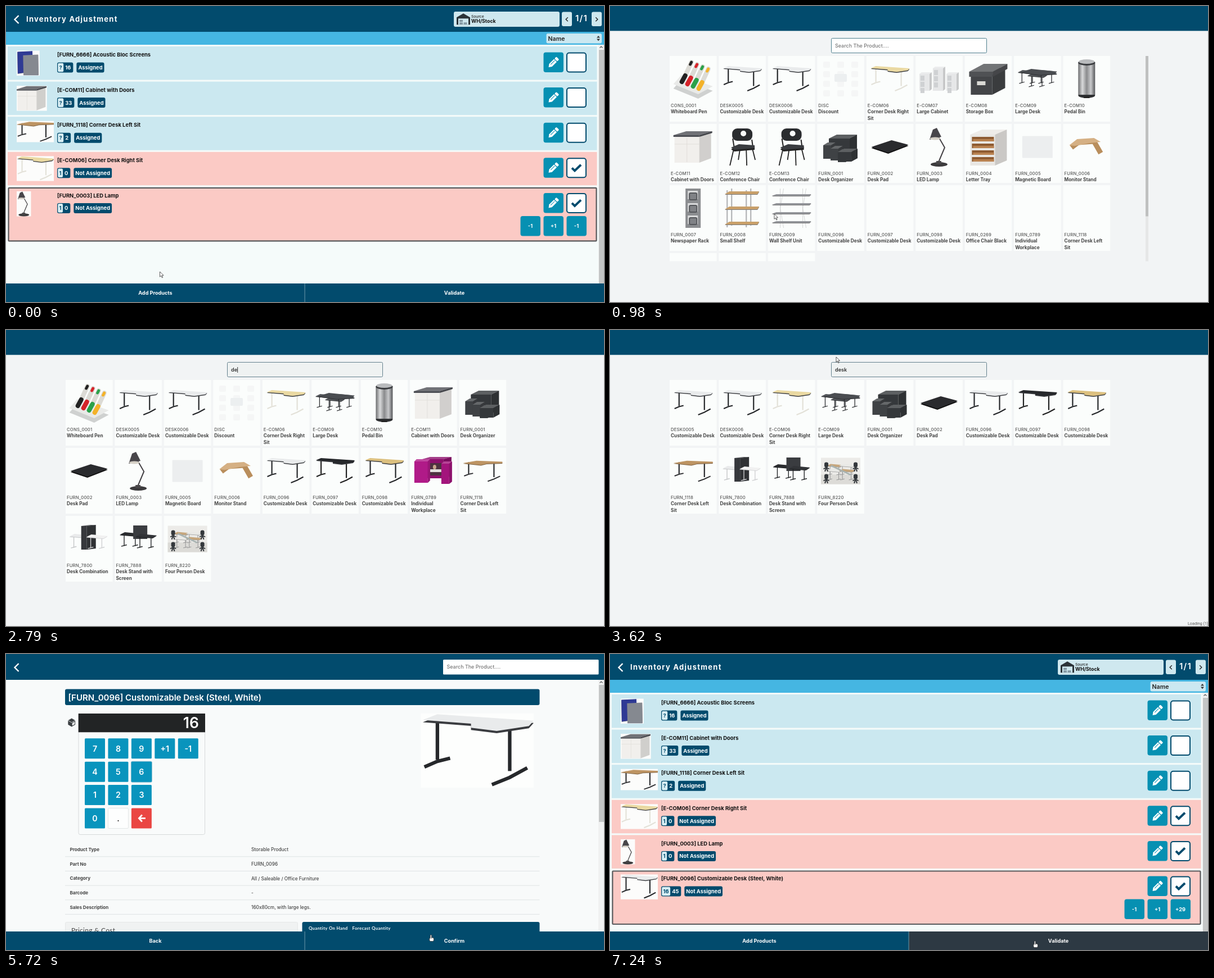
Animation, 1063 px wide and 527 px high, one loop 7260 ms. Source, as an HTML page with a canvas:

```html
<!DOCTYPE html>
<html lang="en">
<head>
<meta charset="utf-8">
<title>Inventory Adjustment</title>
<style>
html, body { margin: 0; width: 100%; height: 100%; overflow: hidden; background: #f2f4f5; }
canvas { display: block; }
</style>
</head>
<body>
<canvas id="stage" width="1063" height="527"></canvas>
<script>
const g = document.getElementById('stage').getContext('2d');
const LOOP = 7260;
const NAVY = '#024b6d', TEAL = '#0690b2', KEY = '#0994bd', HOVER = '#2d3943', INK = '#2a2c2f';
const SANS = 'Inter, "Open Sans", sans-serif', LATO = 'Lato, "Open Sans", sans-serif';
const times = (n, f) => { for (let i = 0; i < n; i++) f(i); };

// ---- drawing helpers ----
function rect(c, x, y, w, h) { g.fillStyle = c; g.fillRect(x, y, w, h); }
function box(x, y, w, h, fill, r = 3, stroke, lw = 1) {
  g.beginPath(); g.roundRect(x, y, w, h, r);
  if (fill) { g.fillStyle = fill; g.fill(); }
  if (stroke) { g.strokeStyle = stroke; g.lineWidth = lw; g.stroke(); }
}
function path(p) {
  g.beginPath();
  for (let i = 0; i < p.length; i += 2) g.lineTo(p[i], p[i + 1]);
}
function poly(c, ...p) { path(p); g.fillStyle = c; g.fill(); }
function line(c, w, ...p) { path(p); g.strokeStyle = c; g.lineWidth = w; g.stroke(); }
function oval(c, x, y, rx, ry = rx) {
  g.beginPath(); g.ellipse(x, y, rx, ry, 0, 0, 7); g.fillStyle = c; g.fill();
}
function at(x, y, s, f) { g.save(); g.translate(x, y); g.scale(s, s); f(); g.restore(); }
// a flat top with a darker edge below it
function slab(c, edge, thick, ...p) {
  at(0, thick, 1, () => poly(edge, ...p));
  poly(c, ...p);
}
// an oblique box: front face, lighter top, darker side
function block(c, x, y, w, h, dx, dy) {
  const r = x + w;
  rect(c, x, y, w, h);
  for (const [shade, ...p] of [
    ['#fff3', x, y, x + dx, y - dy, r + dx, y - dy, r, y],
    ['#0002', r, y, r + dx, y - dy, r + dx, y - dy + h, r, y + h],
  ]) { poly(c, ...p); poly(shade, ...p); }
}
// y is the middle of the capitals
function text(s, x, y, size, color, { w = 700, align = 'left', font = SANS, gap = 0 } = {}) {
  g.font = `${w} ${size}px ${font}`;
  g.letterSpacing = gap + 'px';
  g.textAlign = align; g.fillStyle = color;
  g.fillText(s, x, y + size * 0.36);
}
function width(s, size) {
  g.font = `700 ${size}px ${SANS}`; g.letterSpacing = '0px';
  return g.measureText(s).width;
}

// ---- product pictures: [width, height, draw] ----
function legs(c) {
  times(2, k => {
    const x = 9 + 45 * k, y = 5 + 3 * k, end = y + 24 + 4 * k;
    rect(c, x, y, 2.2, end - y);
    line(c, 2.2, x - 7 - 3 * k, end + 4.5 + 4 * k, x + 1, end + 1 + 3 * k, x + 9 + 3 * k, end - 1 - k);
  });
}
function bench(top, leg, x, y, s = .9) {
  at(x, y, s, () => {
    for (const k of [8, 30]) { rect(leg, k, 5, 1.5, 22); line(leg, 1.5, k - 5, 28, k + 6, 25); }
    slab(top, leg, 1, 0, 5, 10, 0, 42, 3, 34, 8);
  });
}
function tiers(c, n, y0, step, w, h) {
  times(n, i => slab(c, '#777', 1, 0, y0 + i * step + h, 8, y0 + i * step, w, y0 + i * step, w - 3, y0 + i * step + h));
}
function spokes(c, x, y, n, r) {
  times(n, i => { const a = i / (n - 1) * Math.PI; line(c, 2, x, y, x + r * Math.cos(a), y + 3 + 5 * Math.sin(a)); });
}

const art = {
  desk: [70, 47, (top, leg) => {
    legs(leg);
    slab(top, '#3a3c40', 1.4, 1, 4.2, 10, .6, 70, 4.6, 67, 8, 47, 11, 31, 9, 31, 6.5);
  }],
  corner: [70, 40, (top, leg) => {
    g.scale(1, .86); legs(leg);
    slab(top, '#7d6244', 1.2, 0, 7, 24, 2, 70, 4, 70, 7, 42, 8, 32, 11);
  }],
  pens: [70, 70, () => {
    slab('#e9eae8', '#cfd1d0', 8, 0, 44, 14, 28, 70, 48, 44, 62);
    g.lineCap = 'round';
    ['#222', '#d6242a', '#2ba14a', '#f3b229'].forEach((c, i) => {
      const x = 32 + 10 * i, y = 5 + 4 * i;
      line('#dcdbd5', 8, x, y, x - 10, y + 22);
      line(c, 8, x - 11, y + 24, x - 17, y + 35);
      line(c, 5, x, y, x - 2, y + 4);
    });
    g.lineCap = 'butt';
  }],
  tiles: [70, 70, () => {
    times(12, i => box(4 + i % 3 * 25, 4 + (i / 3 | 0) * 17, 12, 11, '#f5f6f6', 2));
    box(24, 26, 22, 14, '#eceff0', 2);
  }],
  cabinets: [70, 46, () => times(3, k => {
    const y = 10 * Math.abs(k - 1) + 4;
    block('#e6e7e8', 24 * k, y, 18, 44 - y, 4, 3);
    times(3, i => rect('#cfd1d3', 24 * k + 2, y + 3 + i * 11, 7, 9));
  })],
  box: [70, 56, () => {
    block('#434548', 4, 20, 38, 36, 23, 12);
    block('#4f5154', 1, 15, 42, 9, 26, 14);
    rect('#d9d9d5', 15, 32, 15, 7);
  }],
  large: [70, 44, () => {
    times(3, k => bench('#55585c', INK, 17 * k, 6 + 6 * (k % 2), .85));
    slab('#4a4d51', INK, 1, 4, 10, 24, 4, 62, 8, 70, 13, 38, 15);
  }],
  bin: [32, 70, () => {
    const m = g.createLinearGradient(1, 0, 31, 0);
    ['#6d6e70', '#d9dadb', '#8a8b8d', '#c9cacc', '#55575a'].forEach((c, i) => m.addColorStop(i / 4, c));
    oval('#2e3032', 16, 64, 15, 5); rect(m, 1, 5, 30, 58);
    oval('#3a3c3f', 16, 6, 15, 5); oval('#b9bbbd', 16, 4, 14, 4); rect('#222', 11, 66, 10, 3);
  }],
  cabinet: [70, 58, () => {
    block('#f1efec', 2, 11, 44, 46, 21, 8);
    line('#dcd9d4', .7, 24, 13, 24, 56); line('#dcd9d4', .7, 2, 24, 46, 24);
    block('#4d4f55', 0, 8, 46, 3, 23, 7);
  }],
  chair: [52, 70, () => {
    times(4, i => line('#222', 1.8, 11 + 11 * i, 38, 4 + 15 * i, 58 + 10 * (1 - i % 2)));
    line('#222', 2, 9, 20, 12, 38); line('#222', 2, 43, 22, 45, 36);
    box(8, 2, 36, 22, INK, 9); oval('#f8f9f9', 28, 11, 5);
    slab('#3a3c40', '#222', 3, 6, 36, 20, 30, 48, 32, 48, 37, 12, 40);
  }],
  organizer: [66, 54, () => {
    block('#35383b', 12, 12, 36, 34, 14, 7);
    times(3, i => block('#3f4245', 2 + 13 * i, 24 + 6 * i, 14, 24 - 3 * i, 8, 5));
    block('#35383b', 28, 36, 24, 17, 11, 6);
  }],
  pad: [66, 24, () => slab('#2a2b2e', '#111', 2, 0, 12, 36, 0, 66, 8, 30, 22)],
  lamp: [40, 70, () => {
    oval('#3c3b3d', 20, 66, 15, 4); rect('#4a484a', 15, 60, 9, 5);
    line('#444245', 2, 19, 62, 30, 36, 15, 10);
    poly('#48464a', 9, 4, 16, 1, 24, 17, 3, 22); oval('#d5d0c6', 13, 20, 9, 2.5);
  }],
  tray: [70, 68, () => {
    block('#e9e7e3', 3, 12, 44, 55, 21, 9);
    times(4, i => { rect('#8e5b32', 6, 16 + 12 * i, 39, 8); rect('#b98250', 8, 20 + 12 * i, 37, 4); });
  }],
  board: [54, 39, () => box(0, 0, 54, 39, '#eceeef', 1)],
  stand: [62, 32, () => {
    g.lineJoin = 'round';
    line('#b98e5c', 9, 4, 17, 16, 8, 44, 6, 56, 27);
    poly('#d5b084', 0, 13, 14, 2, 44, 0, 56, 7, 36, 9, 10, 14);
  }],
  rack: [27, 70, () => {
    rect('#8b8d90', 0, 0, 27, 70);
    times(3, i => { const y = 4 + 22 * i; rect('#d9dadb', 4, y, 18, 15); box(7, y + 4, 13, 12, '#808286', 2, '#55575b', 2); });
  }],
  shelves: [62, 70, () => {
    times(4, i => rect('#b2b4b6', 3 + 17 * i + (i % 2 ? -9 : 0), i % 2 ? 0 : 3, 2.2, 66));
    tiers('#c9a06a', 3, 5, 27, 61, 5);
  }],
  wall: [70, 70, () => {
    for (const x of [15, 55]) { line('#c4c6c8', .7, x, 0, x, 70); line('#c4c6c8', .7, x + 6, 0, x, 35, x + 6, 70); }
    tiers('#94969b', 4, 10, 16, 70, 3);
  }],
  office: [48, 70, () => {
    box(9, 0, 28, 37, '#27282b', 8); box(13, 4, 20, 14, '#37393c', 5);
    for (const x of [5, 42]) line('#1d1e20', 3, x, 24, x, 37, 24, 42);
    box(8, 36, 31, 11, '#2e3033', 5); rect('#222', 22, 46, 4, 14);
    spokes('#222', 24, 58, 5, 19);
  }],
  booth: [68, 54, () => {
    block('#8d0f6c', 14, 6, 38, 34, 14, 4); rect('#4d3140', 24, 13, 28, 22);
    rect('#e3e0de', 28, 24, 20, 5); oval('#c8a58c', 36, 20, 3, 4);
    block('#b01a88', 0, 10, 24, 38, 4, 4); block('#a3147c', 48, 14, 14, 36, 5, 4);
  }],
  screens: [64, 70, () => ['#2f3a94', '#858990'].forEach((c, i) => {
    const x = 2 + 16 * i, y = 2 + 10 * i;
    slab(c, '#555a70', 1, x, y + 1, x + 42, y - 1, x + 43, y + 56, x + 1, y + 62 - 6 * i);
  })],
  combo: [70, 52, () => {
    bench('#e9eaeb', '#c3c5c7', 0, 17); block('#36383c', 21, 3, 10, 42, 16, 2); bench('#f1f1f1', '#cfd0d2', 30, 18);
  }],
  screen: [66, 50, () => {
    bench(INK, '#1e2022', 0, 13); rect('#3a3c40', 24, 1, 25, 24); bench('#323438', '#1e2022', 28, 16);
  }],
  four: [70, 47, () => {
    rect('#ecebe8', 0, 0, 70, 47); rect('#dcdbd7', 0, 30, 70, 17);
    times(4, i => bench(i % 3 ? '#e9e9e6' : '#c6a67c', '#999', 10 + i % 2 * 22, 11 + (i >> 1) * 9, .7));
    line('#a9b4b2', 3, 18, 14, 52, 30);
    times(4, i => { const x = 6 + i % 2 * 52, y = 8 + (i >> 1) * 21; box(x, y, 7, 9, '#34383c', 3); spokes('#34383c', x + 3.5, y + 9, 4, 5); });
  }],
};
const WHITE = ['desk', '#e9ebec', '#26282b'], OAK = ['corner', '#bd9463', '#2a2b2e'],
  BIRCH = ['desk', '#ead9a2', '#e3e1d8'], BLACK = ['desk', '#26282b', '#222'], PINE = ['desk', '#dcc07f', '#26282b'];

function pic([kind, ...args], x, y, s = 1) { at(x, y, s, () => art[kind][2](...args)); }

// ---- catalogue ----
const DESK = 'Customizable Desk';
const catalogue = [
  ['CONS_0001', 'Whiteboard Pen', ['pens']], ['DESK0005', DESK, WHITE], ['DESK0006', DESK, WHITE],
  ['DISC', 'Discount', ['tiles']], ['E-COM06', 'Corner Desk Right|Sit', BIRCH],
  ['E-COM07', 'Large Cabinet', ['cabinets']], ['E-COM08', 'Storage Box', ['box']],
  ['E-COM09', 'Large Desk', ['large']], ['E-COM10', 'Pedal Bin', ['bin']],
  ['E-COM11', 'Cabinet with Doors', ['cabinet']], ['E-COM12', 'Conference Chair', ['chair']],
  ['E-COM13', 'Conference Chair', ['chair']], ['FURN_0001', 'Desk Organizer', ['organizer']],
  ['FURN_0002', 'Desk Pad', ['pad']], ['FURN_0003', 'LED Lamp', ['lamp']],
  ['FURN_0004', 'Letter Tray', ['tray']], ['FURN_0005', 'Magnetic Board', ['board']],
  ['FURN_0006', 'Monitor Stand', ['stand']], ['FURN_0007', 'Newspaper Rack', ['rack']],
  ['FURN_0008', 'Small Shelf', ['shelves']], ['FURN_0009', 'Wall Shelf Unit', ['wall']],
  ['FURN_0096', DESK, WHITE], ['FURN_0097', DESK, BLACK], ['FURN_0098', DESK, PINE],
  ['FURN_0269', 'Office Chair Black', ['office']], ['FURN_0789', 'Individual|Workplace', ['booth']],
  ['FURN_1118', 'Corner Desk Left|Sit', OAK], ['FURN_5555', 'Flipover', ['board']],
  ['FURN_6666', 'Acoustic Bloc|Screens', ['screens']], ['FURN_6741', 'Meeting Table', ['pad']],
  ['FURN_7800', 'Desk Combination', ['combo']], ['FURN_7888', 'Desk Stand with|Screen', ['screen']],
  ['FURN_8220', 'Four Person Desk', ['four']],
];

function loading(plain) {
  if (!plain) rect('#6c62a2', 1023, 513, 40, 14);
  text('Loading (1)', plain ? 1027 : 1025, plain ? 522 : 520, 7.2, plain ? '#555' : '#fff', { w: 400, font: 'Roboto, sans-serif' });
}

function card([code, name, img], x, y, h, ready) {
  rect('#fbfdfc', x, y, 83.5, h);
  const [w, ih] = art[img[0]];
  if (ready) pic(img, x + 41.7 - w / 2, y + 41 - ih / 2);
  text(code, x + 2, y + 88, 7.7, '#555', { w: 500, gap: .2 });
  name.split('|').forEach((s, k) => text(s, x + 2, y + 99.5 + k * 12, 8.25, '#444'));
}
function grid(t, query) {
  const found = catalogue.filter(p => p[1].toLowerCase().includes(query)).slice(0, 30);
  const top = 89, view = 365.5;
  g.save();
  g.beginPath(); g.rect(100, top, 860, view); g.clip();
  let y = top;
  for (let i = 0; i < found.length; i += 9) {
    const row = found.slice(i, i + 9), h = row.some(p => p[1].includes('|')) ? 117 : 105;
    row.forEach((p, j) => card(p, 106 + j * 87.45, y, h, t > 780 + (i + j) * 10));
    y += h + 4;
  }
  g.restore();
  const full = y - 4 - top;
  if (full > view) {
    rect('#e6e7e7', 952, top, 5, view);
    rect('#bfc0c0', 952, top, 5, view * view / full);
  }
}

const within = (t, a, b) => t >= a && t < b;

function searchPage(t) {
  rect('#f2f4f5', 0, 0, 1063, 527);
  rect(NAVY, 0, 0, 1063, 44.3);
  const typed = 'desk'.slice(0, Math.max(0, Math.ceil((t - 2470) / 230)));
  const focus = t >= 1700;
  box(393.5, 57.5, 276, 26, focus ? '#eff2f2' : '#fff', 2, focus ? '#64808d' : '#4f7f8e');
  if (typed) text(typed, 400, 71, 9.1, '#333', { w: 600 });
  else if (!focus) text('Search The Product....', 400, 71, 8.95, '#777', { w: 500 });
  if (focus && (t - 1700) % 1000 < 560) rect('#333', 400 + width(typed, 9.1), 66, 1, 10);
  if (t < 700) text('No results', 531.5, 95.5, 7.2, '#444', { w: 600, align: 'center' });
  else grid(t, t < 2700 ? '' : t < 3060 ? 'd' : 'desk');
  if (t < 720 || within(t, 2620, 2740) || within(t, 3000, 3100) || t > 4310) loading();
  if (within(t, 3550, 3680)) loading(true);
}

// ---- shared chrome ----
function topBar() {
  rect(NAVY, 0, 0, 1063, 46);
  line('#fff', 2.4, 22.5, 17, 15.5, 24, 22.5, 31);
}
function footer(labels, hover) {
  labels.forEach((s, i) => {
    rect(s === hover ? HOVER : NAVY, 531 * i, 494, 532, 33);
    text(s, 265.5 + 531.5 * i, 511, 9.15, '#fff', { align: 'center' });
  });
  rect('#6f98aa', 530.6, 494, 1, 33);
}
function scrollbar(y, end) {
  rect('#f0f1f1', 1053, y, 10, 494 - y);
  rect('#c3c5c5', 1054, y + 9, 9, end - y - 9);
  line('#555', 1.2, 1055.5, y + 5.5, 1058, y + 3, 1060.5, y + 5.5);
}

// ---- inventory list ----
const stock = [
  ['[FURN_6666] Acoustic Bloc Screens', ['screens'], '?', '16'],
  ['[E-COM11] Cabinet with Doors', ['cabinet'], '?', '33'],
  ['[FURN_1118] Corner Desk Left Sit', OAK, '?', '2'],
  ['[E-COM06] Corner Desk Right Sit', BIRCH, '1', '0'],
  ['[FURN_0003] LED Lamp', ['lamp'], '1', '0', '-1'],
  ['[FURN_0096] Customizable Desk (Steel, White)', WHITE, '16', '45', '+29'],
];

function button(x, y) { box(x, y, 35.5, 35.5, TEAL, 4); }
function pencil(x, y) {
  g.save(); g.translate(x, y); g.rotate(-Math.PI / 4);
  poly('#fff', -12, 0, -7, -3.5, 5, -3.5, 5, 3.5, -7, 3.5);
  box(6.3, -3.5, 4.7, 7, '#fff', 1.5);
  line(TEAL, 1, -6, -.8, 4, -.8);
  g.restore();
}
function stockRow([name, img, done, qty, diff], y, selected, ready) {
  const free = done === '?', size = 9.4, mid = y + 37.6;
  if (selected) box(4.5, y + 1.5, 1045, 94.5, '#fbcac5', 1, '#58595b', 2.2);
  else rect(free ? '#cbe8f0' : '#fbcac5', 3, y, 1047.5, 59.5);
  const [w, h] = art[img[0]], s = Math.min(66 / w, 44.5 / h);
  if (ready) {
    rect('#fcfcfb', 19, y + 7.5, w * s, h * s);
    pic(img, 19, y + 7.5, s);
  }
  text(name, 91, y + 14.8, size, '#111');
  const state = free ? 'Assigned' : 'Not Assigned';
  const a = width(done, size) + 6, b = width(qty, size) + 7, c = width(state, size) + 6;
  box(91, y + 28.5, a + b, 18, NAVY, 3);
  box(92.2, y + 29.7, a - 1.2, 15.6, '#d8eef4', 2);
  text(done, 94.5, mid, size, NAVY);
  text(qty, 94 + a, mid, size, '#fff');
  box(97 + a + b, y + 28.5, c, 18, NAVY, 3);
  text(state, 100 + a + b, mid, size, '#fff');
  button(955.5, y + 10.5); pencil(973, y + 28.5);
  box(997, y + 11.5, 34, 34, '#fff', 4, NAVY, 2);
  if (!free) line(NAVY, 4, 1006, y + 28.5, 1011, y + 33.5, 1022, y + 23);
  if (selected) ['-1', '+1', diff].forEach((s, i) => {
    button(914.5 + i * 41, y + 51.5);
    text(s, 932 + i * 41, y + 69.5, 9.2, '#fff', { align: 'center' });
  });
}
function warehouse(x, y) {
  poly('#2c3338', x, y + 7, x + 12, y, x + 24, y + 7, x + 24, y + 20, x, y + 20);
  rect('#cfe8ef', x + 3, y + 9, 18, 11);
  for (const [i, j] of [[0, 0], [0, 1], [1, 1]]) rect('#8195a0', x + 5 + i * 7.5, y + 11.5 + j * 4.5, 6, 3.4);
}

function listPage(rows, hover, ready) {
  rect('#f5fbfa', 0, 0, 1063, 527);
  topBar();
  rect('#45b6e2', 0, 46, 1063, 23);
  text('Inventory Adjustment', 36, 23, 13, '#fff', { gap: 1.25 });
  box(796, 10, 188, 27, '#cfe8ef', 3);
  warehouse(801, 13.3);
  text('Source', 827, 18.3, 6.7, '#222', { w: 500 });
  text('WH/Stock', 827, 27, 8.8, '#111');
  for (const [x, d] of [[997, -1.8], [1050, 1.8]]) {
    box(x - 9, 10.5, 18, 25.5, '#cfe8ef', 3);
    line('#222', 1.4, x - d, 20.2, x + d, 23.7, x - d, 27.2);
  }
  text('1/1', 1023, 22, 15, '#fff', { w: 600, align: 'center', gap: 1.2 });
  box(960.5, 49, 98.5, 17.5, '#cbe8f1', 3);
  text('Name', 963.5, 58, 10.6, '#222', { w: 600 });
  for (const d of [-1, 1]) poly('#333', 1050, 57.6 + d, 1053, 57.6 + 4.6 * d, 1056, 57.6 + d);
  stock.slice(0, rows).forEach((p, i) => stockRow(p, 72 + i * 62.6, i === rows - 1, ready || i < rows - 1));
  scrollbar(69, 494);
  footer(['Add Products', 'Validate'], hover);
}

// ---- product page ----
const info = [
  ['Product Type', 'Storable Product'], ['Part No', 'FURN_0096'],
  ['Category', 'All / Saleable / Office Furniture'], ['Barcode', '-'],
  ['Sales Description', '160x80cm, with large legs.'],
];
const keypad = ['7 8 9 +1 -1', '4 5 6', '1 2 3', '0 . <'];

function key(k, x, y, pressed) {
  if (pressed) box(x - 1, y - 1, 38, 38, '#7fb9d0', 3);
  const fill = { '.': '#fdfefe', '<': '#ea4643' }[k] || KEY;
  box(x, y, 36, 36, fill, 1.5, k === '.' ? '#e3e6e6' : undefined);
  if (k === '<') {
    line('#fff', 2.8, x + 13.5, y + 18, x + 25, y + 18);
    line('#fff', 2.8, x + 19, y + 12, x + 13.5, y + 18, x + 19, y + 24);
  } else text(k, x + 18, y + 18.2, 14.2, k === '.' ? '#222' : '#fff', { w: 600, align: 'center' });
}
function cube(x, y, r) {
  const corner = i => [x + r * Math.sin(i * Math.PI / 3), y - r * Math.cos(i * Math.PI / 3)];
  poly('#3c4043', ...[0, 1, 2, 3, 4, 5].flatMap(corner));
  poly('#f8fafa', x + 1, y + 1.2, x + r - 2, y - 1.4, x + r - 2, y + 3, x + 1, y + 5.4);
  line('#f8fafa', .8, ...corner(5), x, y, ...corner(1));
}

function productPage(t) {
  rect('#f8fafa', 0, 0, 1063, 527);
  topBar();
  box(777, 10, 276.5, 26.5, '#fff', 1.5);
  text('Search The Product....', 783.5, 23, 8.95, '#777', { w: 500 });
  box(105, 62.5, 843.5, 28.5, NAVY, 3);
  text('[FURN_0096] Customizable Desk (Steel, White)', 110.5, 77.3, 15, '#fff', { w: 600 });
  cube(116.7, 122, 7.4);

  const pressed = t >= 5430;
  box(129, 106.5, 224.5, 215, '#f9fbfb', 3, '#d6d9da');
  rect('#222425', 128.7, 106, 225.3, 33.3);
  text(pressed ? '16' : '1', 343, 122.5, 26.5, '#fff', { w: 600, align: 'right' });
  keypad.forEach((row, r) => row.split(' ').forEach((k, c) =>
    key(k, 140 + c * 41.45, 150.3 + r * 41.4, pressed && k === '6')));

  if (t >= 4780) {
    rect('#fdfefd', 737.5, 105.5, 200.5, 132.5);
    pic(WHITE, 738, 105.5, 200 / 70);
  }
  info.forEach(([k, v], i) => {
    const y = 348.3 + i * 25.65;
    text(k, 113.5, y, 8.05, '#444');
    text(v, 436, y, 8.25, '#444', { w: 500 });
    rect('#dfe3e4', 105, y + 12, 843.5, 1);
  });
  box(105.5, 477.5, 413, 40, '#f0f2f2', 2, '#e6e8e8');
  text('Pricing & Cost', 116, 492, 12, '#444', { w: 400, font: LATO, gap: .25 });
  box(526.5, 477, 422, 40, NAVY, 3);
  ['Quantity On Hand', 'Forecast Quantity'].forEach((s, i) =>
    text(s, 538 + 77.5 * i, 488, 7.8, '#fff', { font: LATO, gap: .35 }));
  scrollbar(46, 299);
  footer(['Back', 'Confirm'], t > 5780 && 'Confirm');
  if (t < 4780 || t > 6160) loading();
}

// ---- pointer: each move is start, end, x, y ----
const moves = [
  [110, 260, 266, 500], [680, 1120, 300, 330], [1270, 1680, 446, 73], [3550, 3610, 402, 48],
  [3640, 4270, 670, 166], [4700, 5300, 240, 206], [5460, 5700, 755, 500], [6400, 6700, 755, 511],
];
function position(t) {
  let x = 273.5, y = 473;
  for (const [from, to, tx, ty] of moves) {
    const u = Math.min(1, Math.max(0, (t - from) / (to - from))), e = u * u * (3 - 2 * u);
    x += (tx - x) * e; y += (ty - y) * e;
  }
  return [x, y];
}
function arrow() {
  path([0, 0, 0, 9.2, 2.2, 7.2, 3.8, 10.8, 5.2, 10.2, 3.7, 6.8, 6.6, 6.6]);
  g.closePath();
  g.fillStyle = '#fff'; g.fill();
  g.strokeStyle = '#333'; g.lineWidth = .8; g.stroke();
}
function hand() {
  box(-2.2, 5, 7.6, 6.5, '#fff', 2, '#333', .8);
  box(-.8, 0, 2.2, 7, '#fff', 1, '#333', .8);
  rect('#fff', -.4, 5.4, 1.4, 4);
}
function beam() {
  line('#333', 1, 0, -4, 0, 4);
  for (const y of [-4.5, 4.5]) line('#333', 1, -2.5, y, 2.5, y);
}
function pointer(t) {
  if (within(t, 2470, 3550)) return;
  const overButton = within(t, 230, 300) || within(t, 5230, 5490) || t > 5680;
  at(...position(t), 1, within(t, 1660, 3560) ? beam : overButton ? hand : arrow);
}

function draw(t) {
  if (t < 300) listPage(5, t > 220 && 'Add Products', true);
  else if (t < 4660) searchPage(t);
  else if (t < 6200) productPage(t);
  else listPage(6, 'Validate', t > 6320);
  pointer(t);
}
function tick() {
  draw(performance.now() % LOOP);
  requestAnimationFrame(tick);
}
tick();
</script>
</body>
</html>
```
